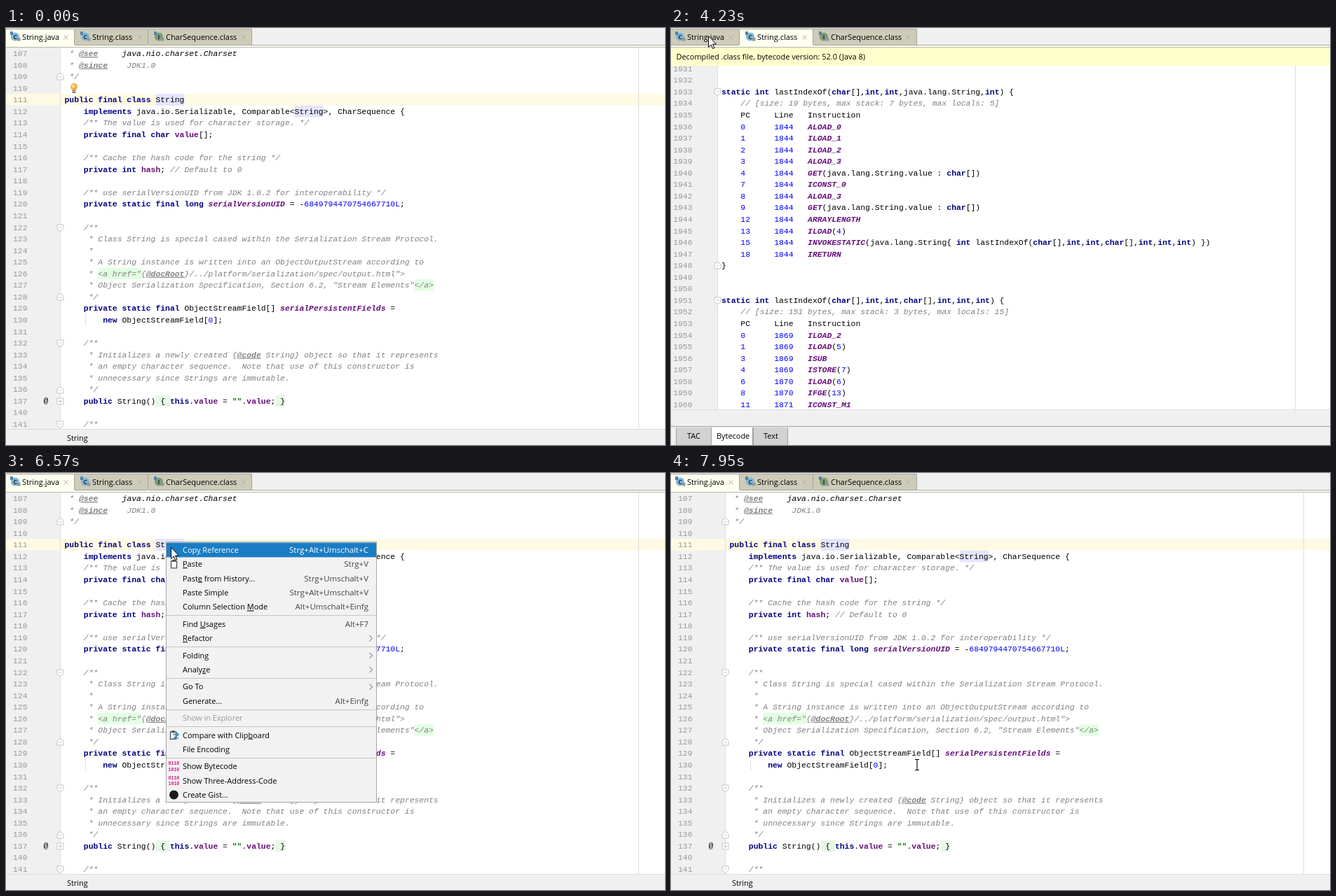
These frames come from a looping animation (940x596 px, 8 s). An HTML page:

```html
<!DOCTYPE html>
<html lang="en">
<head>
<meta charset="utf-8">
<title>Bytecode viewer</title>
<style>
html, body { margin: 0; width: 100%; height: 100%; overflow: hidden; background: #fff; }
svg { display: block; width: 940px; height: 596px; }
text { white-space: pre; }
.code { font: 11.4px "Liberation Mono", monospace; fill: #000; }
.ui { font: 10.95px "Open Sans", sans-serif; fill: #000; }
.key { font-size: 11.5px; fill: #444; }
.num { fill: #999; }
.k { font-weight: bold; fill: #000080; }
.f { font-weight: bold; fill: #660e7a; }
.s { font-weight: bold; font-style: italic; fill: #660e7a; }
.n { fill: #0000ff; }
.g { font-weight: bold; fill: #008000; }
.c { font-style: italic; fill: #808080; }
.t { font-style: italic; font-weight: bold; fill: #808080; text-decoration: underline; }
.i { font-style: italic; }
.u { text-decoration: underline; }
.off { fill: #999; }
.hover text { fill: #fff; }
.bits { font: bold 6.6px "Liberation Mono", monospace; fill: #e6148c; }
</style>
</head>
<body>
<svg id="stage" viewBox="0 0 940 596"></svg>
<script>
const LOOP = 8000, CHAR = 6.841, ROW = 16.56;
const GUTTER = '#f0f0f0', LINE = '#c9c9c9';

const esc = s => s.replace(/&/g, '&amp;').replace(/</g, '&lt;');
const rect = (x, y, w, h, fill, more = '') =>
  `<rect x="${x}" y="${y}" width="${w}" height="${h}" fill="${fill}" ${more}/>`;
const path = (d, stroke, more = 'fill="none"') => `<path d="${d}" stroke="${stroke}" ${more}/>`;
const text = (x, y, body, cls, more = '') =>
  `<text x="${x}" y="${y + 3.8}" class="${cls}" ${more}>${body}</text>`;
const group = (id, body) => `<g id="${id}">${body}</g>`;

// "~" plus one letter switches the style of the following text.
const styled = line => line.split('~').map((part, i) => i
  ? `<tspan class="${part[0]}">${esc(part.slice(1))}</tspan>` : esc(part)).join('');

const javaLines = `~c * ~t@see~c     ~ijava.nio.charset.Charset
~c * ~t@since~c    JDK1.0
~c */

~kpublic final class~p String
    ~kimplements~p java.io.Serializable, Comparable<String>, CharSequence {
~c    /** The value is used for character storage. */
    ~kprivate final char ~fvalue~p[];

~c    /** Cache the hash code for the string */
    ~kprivate int ~fhash~p; ~c// Default to 0

~c    /** use serialVersionUID from JDK 1.0.2 for interoperability */
    ~kprivate static final long ~sserialVersionUID~p = -~n6849794470754667710L~p;

~c    /**
~c     * Class String is special cased within the Serialization Stream Protocol.
~c     *
~c     * A String instance is written into an ObjectOutputStream according to
~c     * <a href="{~t@docRoot~c}/../platform/serialization/spec/output.html">
~c     * Object Serialization Specification, Section 6.2, "Stream Elements"</a>
~c     */
    ~kprivate static final~p ObjectStreamField[] ~sserialPersistentFields~p =
        ~knew~p ObjectStreamField[~n0~p];

~c    /**
~c     * Initializes a newly created {~t@code~c String} object so that it represents
~c     * an empty character sequence.  Note that use of this constructor is
~c     * unnecessary since Strings are immutable.
~c     */
    ~kpublic~p String() { ~kthis~p.~fvalue~p = ~g""~p.~fvalue~p; }

~c    /**`.split('\n');

const op = (pc, line, name, args = '') =>
  `    ~n${String(pc).padEnd(7)}${line}   ~s${name}~p${args}`;
const arg = n => `(~n${n}~p)`;
const types = list => list.split(',').map(t =>
  t.replace(/^(char|int)/, '~k$1~p')).join(',');
const getValue = '(java.lang.String.value : ~kchar~p[])';
const head = '    PC     Line   Instruction';
const longArgs = types('char[],int,int,char[],int,int,int');
const classLines = [
  '', '',
  `~kstatic int~p lastIndexOf(${types('char[],int,int,java.lang.String,int')}) {`,
  '~c    // [size: 19 bytes, max stack: 7 bytes, max locals: 5]',
  head,
  op(0, 1844, 'ALOAD_0'), op(1, 1844, 'ILOAD_1'), op(2, 1844, 'ILOAD_2'), op(3, 1844, 'ALOAD_3'),
  op(4, 1844, 'GET', getValue), op(7, 1844, 'ICONST_0'), op(8, 1844, 'ALOAD_3'),
  op(9, 1844, 'GET', getValue), op(12, 1844, 'ARRAYLENGTH'), op(13, 1844, 'ILOAD', arg(4)),
  op(15, 1844, 'INVOKESTATIC', `(java.lang.String{ ~kint~p lastIndexOf(${longArgs}) })`),
  op(18, 1844, 'IRETURN'),
  '}', '', '',
  `~kstatic int~p lastIndexOf(${longArgs}) {`,
  '~c    // [size: 151 bytes, max stack: 3 bytes, max locals: 15]',
  head,
  op(0, 1869, 'ILOAD_2'), op(1, 1869, 'ILOAD', arg(5)), op(3, 1869, 'ISUB'),
  op(4, 1869, 'ISTORE', arg(7)), op(6, 1870, 'ILOAD', arg(6)), op(8, 1870, 'IFGE', arg(13)),
  op(11, 1871, 'ICONST_M1')
];

const listing = (lines, x, top, number) => lines.map((line, i) => {
  const y = top + i * ROW;
  return text(30.5, y, number(i), 'code num', 'text-anchor="end"') + text(x, y, styled(line), 'code');
}).join('');

const folds = {
  open: 'M-4.5-4.5h9v6l-3 3h-3l-3-3zM-2-.5h4',
  close: 'M-4.5 4.5h9v-6l-3-3h-3l-3 3zM-2 .5h4',
  plus: 'M-4.5-4.5h9v9h-9zM-2.5 0h5M0-2.5v5'
};
const fold = (kind, x, y) =>
  `<path d="${folds[kind]}" transform="translate(${x} ${y})" fill="#fff" stroke="#c4c4c4"/>`;

function tabIcon(x, letter, color) {
  return `<circle cx="${x}" cy="12.5" r="6" fill="${color}"/>` +
    text(x, 12.3, letter, 'ui', 'text-anchor="middle" style="font-size:9px;font-weight:bold;fill:#234"') +
    rect(x - 7, 5, 4, 5, '#4f86ad') + rect(x + 3, 14, 4.5, 4.5, '#8d9aa3');
}

function tabs(active) {
  const list = [[0, 97, 'String.java', 'C', 23], [98, 104, 'String.class', 'C', 123],
    [203, 147, 'CharSequence.class', 'I', 228]];
  return rect(0, 0, 940, 28, '#f0f0f0') + rect(0, 24, 940, 3, '#fdfdf0') +
    list.map(([x, w, label, letter, tx], i) => {
      const on = i === active;
      const cx = x + w - 11.5;
      return rect(x, 1, w, on ? 25 : 23, on ? '#fffff0' : '#cecbb8') +
        path(`M${x} 1.5h${w + .5}v22.5`, '#a5a5a0') +
        (on ? '' : path(`M${x} 24.5h${w}`, '#a5a5a0')) +
        tabIcon(tx - 10, letter, letter === 'C' ? '#7fb7d6' : '#7d9a76') +
        text(tx, 13, label, 'ui') +
        path(`M${cx - 3} 10.5l6 6m0-6l-6 6`, '#aaa');
    }).join('') +
    path('M350 24.5h590', '#a5a5a0') + path('M0 27.5h940', '#b8b8b0');
}

function javaScene() {
  const x = 83.5, top = 36.3, rowY = n => top + (n - 107) * ROW;
  const mark = (n, col, len, fill) =>
    rect(x + col * CHAR, rowY(n) - 8.3, len * CHAR, ROW, fill);
  return rect(0, 0, 940, 596, '#fff') + rect(0, 28, 77, 546, GUTTER) +
    rect(0, 94, 940, 16.5, '#fffae3') +
    path('M77.5 28v546M902.5 28v546', '#dedede') +
    mark(111, 19, 6, '#e4e4ff') + mark(112, 48, 6, '#e4e4ff') +
    mark(126, 7, 9, '#e2ffe2') + mark(127, 73, 4, '#e2ffe2') +
    mark(137, 19, 3, '#e6f8e6') + mark(137, 44, 2, '#e6f8e6') +
    path('M113.5 409v16', '#ddd') +
    listing(javaLines, x, top, i => 107 + i + (i > 30 ? 2 : 0)) +
    [['close', 109], ['open', 122], ['close', 128], ['open', 132], ['close', 136], ['plus', 137], ['open', 139]]
      .map(([kind, n]) => fold(kind, 77.5, Math.round(rowY(n)) + .5)).join('') +
    text(57, 532, '@', 'code', 'text-anchor="middle"') +
    rect(0, 573, 940, 23, '#f0f0f0') + path('M0 573.5h940', '#dcdcdc') +
    text(87, 586, 'String', 'ui') + tabs(0);
}

function classScene() {
  const bottomTab = (x, w, tx, label, fill) => rect(x, 571, w, 25, fill) +
    path(`M${x + .5} 571v25M${x + w + .5} 571v25`, '#a0a0a0') + text(tx, 583, label, 'ui');
  return rect(0, 0, 940, 596, '#fff') + rect(0, 54, 66, 492, GUTTER) +
    path('M66.5 54v492M890.5 54v492', '#dedede') +
    listing(classLines, 72, 57.9, i => 1931 + i) +
    fold('open', 66.5, 91.5) + fold('close', 66.5, 339.5) + fold('open', 66.5, 389.5) +
    rect(0, 28, 940, 26, '#ffffcc') +
    text(7.5, 41.5, 'Decompiled .class file, bytecode version: 52.0 (Java 8)', 'ui') +
    rect(0, 546, 940, 50, '#f0f0f0') + path('M0 545.5h940', '#e0e0e0') + path('M0 569.5h940', '#a0a0a0') +
    bottomTab(7, 50, 23, 'TAC', '#d2d2d2') + bottomTab(117, 49, 132, 'Text', '#d2d2d2') +
    bottomTab(57, 59, 65, 'Bytecode', '#fff') + tabs(1);
}

// Label ("_" precedes the mnemonic), shortcut or ">", "-" marks a separator above.
const items = [
  ['Cop_y Reference', 'Strg+Alt+Umschalt+C'], ['_Paste', 'Strg+V'],
  ['Past_e from History...', 'Strg+Umschalt+V'], ['Paste Simple', 'Strg+Alt+Umschalt+V'],
  ['Column Selection _Mode', 'Alt+Umschalt+Einfg'],
  ['Find _Usages', 'Alt+F7', '-'], ['_Refactor', '>'],
  ['Folding', '>', '-'], ['Analy_ze', '>'],
  ['Go To', '>', '-'], ['Generate...', 'Alt+Einfg'],
  ['Show in Explorer', '', '-'],
  ['Compare with Clip_board', '', '-'], ['File Encoding', ''],
  ['Show Bytecode', '', '-'], ['Show Three-Address-Code', ''], ['Create Gist...', '']
];
const DISABLED = 11;
const itemY = [];

function menuIcon(i, y) {
  const board = path(`M235.5 ${y - 4.5}h8v10h-8z`, '#555', 'fill="#fff" stroke-width="1.4"') +
    rect(237, y - 6.5, 5, 3, '#555');
  if (i === 1) return board;
  if (i === 12) return `<g transform="translate(-1 0)">${board}</g>` +
    path(`M238 ${y - 1}h8m-3-3l3 3-3 3M246 ${y + 4}h-6m2-2l-2 2 2 2`, '#2c8fc9', 'fill="none" stroke-width="1.5"');
  if (i === 14 || i === 15) return text(231.5, y - 6.2, '0110', 'bits') + text(231.5, y + 2.2, '1010', 'bits');
  if (i === 16) return `<circle cx="239.5" cy="${y - .5}" r="6.5" fill="#1b1b1b"/>`;
  return '';
}

function menuScene() {
  let y = 110 - 20.4;
  const rows = items.map(([label, key, sep], i) => {
    y += 20.4 + (sep ? 4 : 0);
    itemY.push(y);
    const name = label.replace(/_(.)/, '<tspan class="u">$1</tspan>');
    const right = key === '>' ? path(`M518.5 ${y - 4}l4 4-4 4`, '#555')
      : text(517, y, key, 'ui key', 'text-anchor="end"');
    return (sep ? path(`M229 ${Math.round(y - 12.7) + .5}h299`, '#c6c6c6') : '') +
      `<g class="item">${rect(229, y - 10.4, 299, 20.8, '#1a7dc4', 'class="bar" visibility="hidden"')}` +
      menuIcon(i, y) + text(252, y, name, 'ui' + (i === DISABLED ? ' off' : '')) + right + '</g>';
  }).join('');
  return rect(228.5, 98.5, 300, 372, '#f2f2f2', `stroke="#a5a5a5"`) + rows;
}

const bulb = '<circle cx="97" cy="84" r="5" fill="#f5ac3d"/><circle cx="96" cy="83" r="2.6" fill="#ffd58a"/>' +
  rect(94.5, 88.5, 5, 4.5, '#777') + path('M94.5 90.5h5', '#ddd');
const beam = path('M-3-7.5h2.5l.5.5.5-.5h2.5M0-7v14M-3 7.5h2.5l.5-.5.5.5h2.5', '#000', 'fill="none" stroke-width="1.1"');
const arrow = path('M.5.5v16l3.7-3.5 2.4 5.5 2.3-1-2.4-5.4h4.9z', '#000', 'fill="#fff"');

const stage = document.getElementById('stage');
stage.innerHTML = group('java', javaScene()) + group('bulb', bulb) + group('bytecode', classScene()) +
  group('menu', menuScene()) + group('beam', beam) + group('arrow', arrow);
const part = Object.fromEntries(['java', 'bulb', 'bytecode', 'menu', 'beam', 'arrow']
  .map(id => [id, document.getElementById(id)]));
const itemNodes = [...document.querySelectorAll('.item')];

// Start, end, steps, from x, y, to x, y
const moves = [
  [760, 1540, 11, 759, 537, 247, 112],
  [1600, 1880, 4, 243, 110, 231, 104],
  [2370, 2370, 1, 237, 107, 237, 107],
  [3690, 4230, 8, 228, 102, 53, 11],
  [4810, 5400, 9, 58, 13, 230, 99],
  [5870, 5870, 1, 229, 98, 229, 98],
  [6570, 6950, 6, 235, 106, 348, 338],
  [7030, 7320, 5, 350, 356, 349, 414],
  [7400, 7400, 1, 349, 415, 349, 415],
  [7950, 7950, 1, 351, 417, 351, 417]
];

function pointer(t) {
  const move = moves.filter(m => t >= m[0]).pop();
  if (!move) return null;
  const [start, end, steps, x0, y0, x1, y1] = move;
  const last = steps - 1;
  const p = last ? Math.min(last, Math.floor((t - start) / (end - start) * last + 1e-6)) / last : 1;
  const e = p * p * (3 - 2 * p);
  return { x: Math.round(x0 + (x1 - x0) * e), y: Math.round(y0 + (y1 - y0) * e) };
}

const show = (node, on) => { node.style.display = on ? '' : 'none'; };
const within = (t, a, b) => t >= a && t < b;

function draw(t) {
  const inClass = within(t, 2540, 4310);
  const inMenu = within(t, 5870, 7850);
  const at = pointer(t);
  const isArrow = at && (within(t, 5870, 7950) || at.y < (inClass ? 54 : 28) || at.x < (inClass ? 66 : 77));
  show(part.java, !inClass);
  show(part.bytecode, inClass);
  show(part.bulb, t < 2370 || within(t, 4810, 5790));
  show(part.menu, inMenu);
  show(part.arrow, isArrow);
  show(part.beam, at && !isArrow);
  if (at) for (const node of [part.arrow, part.beam])
    node.setAttribute('transform', `translate(${at.x} ${at.y})`);
  itemNodes.forEach((node, i) => {
    const on = inMenu && t >= 6570 && i !== DISABLED && Math.abs(at.y - itemY[i]) < 10.2;
    node.classList.toggle('hover', on);
    node.querySelector('.bar').setAttribute('visibility', on ? 'visible' : 'hidden');
  });
}

function tick() {
  draw(performance.now() % LOOP);
  requestAnimationFrame(tick);
}
tick();
</script>
</body>
</html>
```
